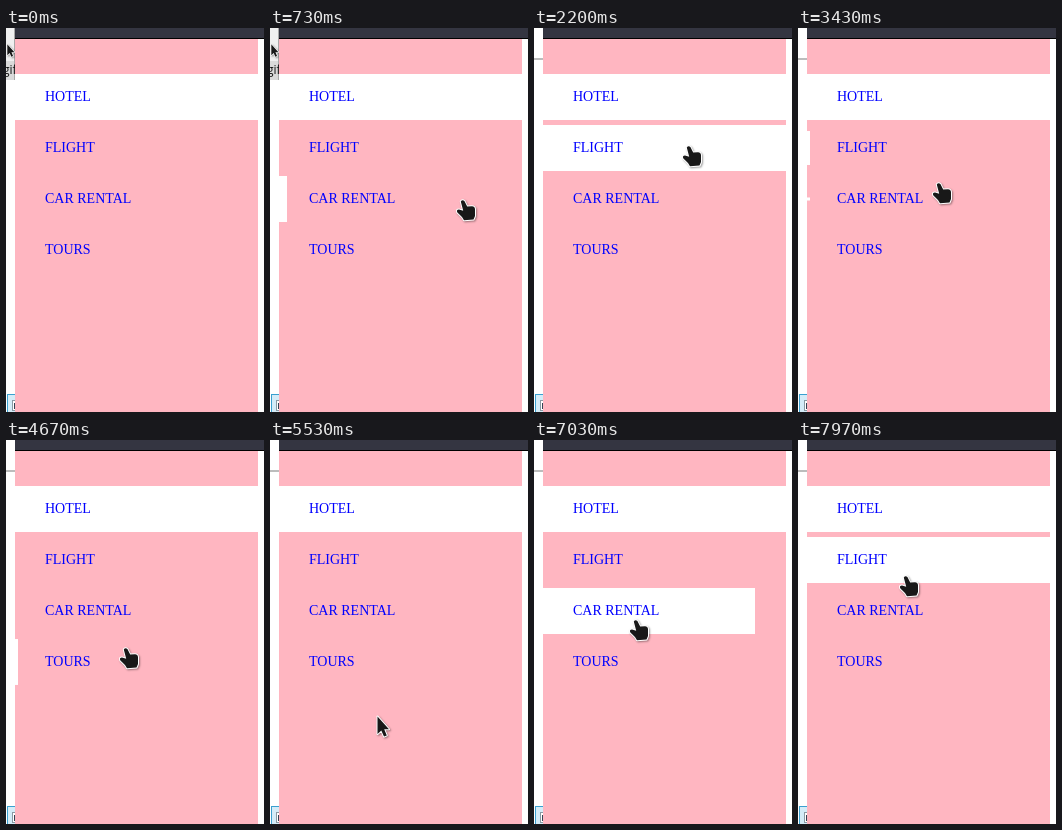
These frames come from a looping animation (258 by 384 pixels, 8000 ms). An HTML page with a canvas:

```html
<!DOCTYPE html>
<html lang="en">
<head>
<meta charset="utf-8">
<title>Travel menu</title>
<style>
  html, body { margin: 0; width: 100%; height: 100%; overflow: hidden; background: #fff; }
  canvas { display: block; width: 258px; height: 384px; }
</style>
</head>
<body>
<canvas id="stage"></canvas>
<script>
const W = 258, H = 384, LOOP = 8000;
const canvas = document.getElementById('stage');
const ctx = canvas.getContext('2d');
const dpr = window.devicePixelRatio || 1;
canvas.width = W * dpr;
canvas.height = H * dpr;

const MENU = { x: 9, y: 11, w: 243, first: 46, step: 51, rowH: 46 };
const LABELS = ['HOTEL', 'FLIGHT', 'CAR RENTAL', 'TOURS'];

// Hover effect: a thin bar scales up, then widens; leaving scales it down.
const BAR = 3, GROW = 200, WIDEN = 400;
const LAG = 26; // the page reacts a little after the pointer

// Pointer moves: [start, end, x, y]; it rests in between.
const ENTRY = { time: 70, x: 254, y: 267 };
const MOVES = [
  [70, 520, 194, 172],
  [905, 1135, 191, 212],
  [1288, 1330, 191, 177],
  [1330, 1760, 156, 118],
  [2400, 2600, 150, 68],
  [3050, 3414, 142, 154],
  [3414, 3700, 139, 170],
  [4350, 4480, 123, 205],
  [4480, 5200, 116, 216],
  [5200, 5400, 107, 276],
  [5660, 5950, 105, 215],
  [6514, 6610, 103, 180],
  [7080, 7310, 106, 139],
  [7310, 7970, 109, 136]
];

const HAND = new Path2D('M-3.2 1.4Q-1.6-.8.4 1L3.2 6.6L8 6.2Q10.6 6.2 11 9' +
  'V16L9.5 19.5L0 20.2L-2 17L-6.8 12.2Q-7.8 9.4-5 9.4L-.8 10.8Z');
const ARROW = new Path2D('M.5.5V18L4.3 14.4L7 20.6L9.8 19.4L7.2 13.3H12Z');

const clamp = p => Math.max(0, Math.min(1, p));

function bezier(x1, y1, x2, y2) {
  const at = (a, b, u) => 3 * a * u * (1 - u) ** 2 + 3 * b * u * u * (1 - u) + u ** 3;
  return p => {
    if (p <= 0) return 0;
    if (p >= 1) return 1;
    let lo = 0, hi = 1;
    for (let i = 0; i < 24; i++) {
      const mid = (lo + hi) / 2;
      if (at(x1, x2, mid) < p) lo = mid; else hi = mid;
    }
    return at(y1, y2, lo);
  };
}
const ease = bezier(.25, .1, .25, 1);
const snap = bezier(1, 0, 0, 1);

function pointerAt(t) {
  if (t < ENTRY.time) return null;
  let { x, y } = ENTRY;
  for (const [start, end, toX, toY] of MOVES) {
    const p = clamp((t - start) / (end - start));
    x += (toX - x) * p;
    y += (toY - y) * p;
  }
  return { x, y };
}

const rowTop = i => MENU.first + i * MENU.step;

function rowAt(pos) {
  if (!pos || pos.x >= MENU.x + MENU.w) return -1;
  return LABELS.findIndex((_, i) => pos.y >= rowTop(i) && pos.y < rowTop(i) + MENU.rowH);
}

// Walk the pointer's path once and note when it is over each row.
function findHovers() {
  const hovers = [];
  let last = -1;
  for (let t = 0; t < LOOP; t++) {
    const row = rowAt(pointerAt(t - LAG));
    if (row !== last && row >= 0) hovers.push({ row, enter: t, leave: LOOP });
    if (row !== last && last >= 0) hovers.find(h => h.leave === LOOP).leave = t;
    last = row;
  }
  return hovers;
}
const hovers = findHovers();

function rect(color, x, y, w, h) {
  ctx.fillStyle = color;
  ctx.fillRect(x, y, w, h);
}

function drawBar({ row, enter, leave }, t) {
  if (t < enter || t > leave + GROW) return;
  const held = Math.min(t, leave) - enter;
  const scale = ease(held / GROW) * (1 - ease((t - leave) / GROW));
  const width = Math.round(BAR + (MENU.w - BAR) * snap((held - GROW) / WIDEN));
  const h = MENU.rowH * scale;
  rect('#fff', MENU.x, rowTop(row) + (MENU.rowH - h) / 2, width, h);
}

function drawShape(path, x, y, size = 1) {
  ctx.save();
  ctx.translate(x, y);
  ctx.scale(size, size);
  ctx.lineJoin = 'round';
  ctx.lineWidth = 2;
  ctx.strokeStyle = '#fff';
  ctx.shadowColor = 'rgba(0, 0, 0, .4)';
  ctx.shadowBlur = 2 * dpr;
  ctx.shadowOffsetX = ctx.shadowOffsetY = dpr;
  ctx.stroke(path);
  ctx.shadowColor = 'transparent';
  ctx.fillStyle = '#181818';
  ctx.fill(path);
  ctx.restore();
}

// Sliver of the desktop left of the page
function drawDesktop(t) {
  if (t < 1970) {
    rect('#f0f0f0', 0, 0, 9, 33);
    rect('#dadada', 0, 33, 9, 19);
    rect('#a8a8a8', 8, 0, 1, 52);
    drawShape(ARROW, 1, 16, .62);
    ctx.fillStyle = '#111';
    ctx.font = '12px "Open Sans", sans-serif';
    ctx.fillText('gif', -3, 46);
  } else {
    rect('#bcbcbc', 0, 30, 9, 2);
  }
  rect('#3aa0d0', 1, 366, 8, 18);
  rect('#d4ecf8', 2, 367, 7, 17);
  rect('#8a9aa4', 6, 372, 3, 11);
  rect('#fff', 7, 373, 2, 9);
  rect('#345', 8, 375, 1, 6);
}

function drawPointer(t) {
  const pos = pointerAt(t);
  if (!pos) return;
  const path = rowAt(pos) >= 0 ? HAND : ARROW;
  drawShape(path, Math.round(pos.x), Math.round(pos.y));
}

function draw(t) {
  ctx.setTransform(dpr, 0, 0, dpr, 0, 0);
  rect('#fff', 0, 0, W, H);
  drawDesktop(t);
  rect('#ffb6c1', MENU.x, MENU.y, MENU.w, H - MENU.y);
  rect('#343541', MENU.x, 0, W - MENU.x, 10);
  rect('#000', MENU.x, 10, W - MENU.x, 1);
  rect('#fff', MENU.x, rowTop(0), MENU.w, MENU.rowH);
  hovers.forEach(hover => drawBar(hover, t));
  ctx.fillStyle = '#00f';
  ctx.font = '14px "Liberation Serif", "Times New Roman", serif';
  LABELS.forEach((label, i) => ctx.fillText(label, MENU.x + 30, rowTop(i) + 27));
  drawPointer(t);
}

const start = performance.now();
function tick() {
  draw((performance.now() - start) % LOOP);
  requestAnimationFrame(tick);
}
tick();
</script>
</body>
</html>
```
